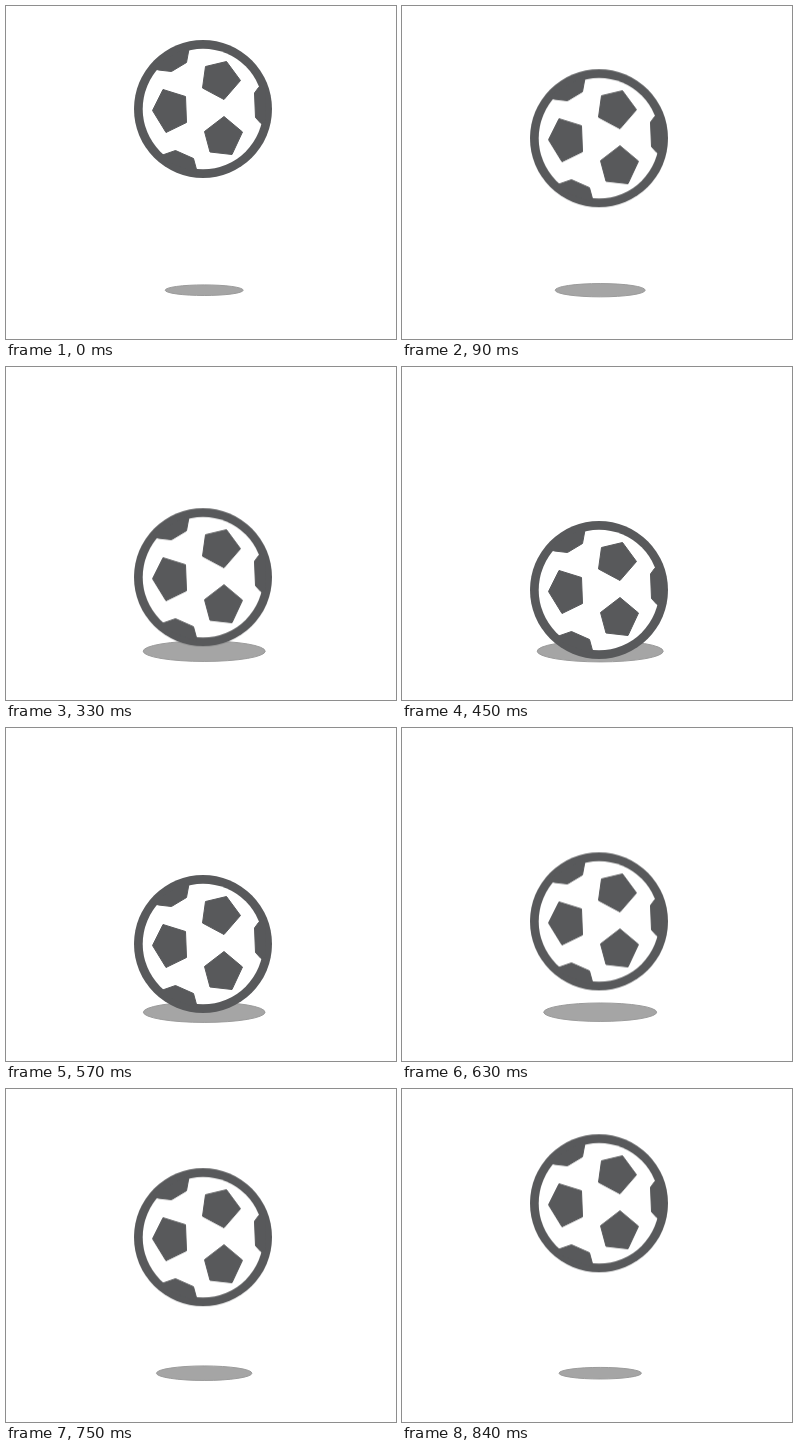
These frames come from a looping animation (390x333 px, 870 ms). An HTML page:

```html
<!DOCTYPE html>
<html lang="en">
<head>
<meta charset="utf-8">
<title>Bouncing ball</title>
<style>
  html, body { margin: 0; width: 100%; height: 100%; overflow: hidden; background: #fff; }
  svg { display: block; width: 390px; height: 333px; }

  .ball { animation: bounce 870ms infinite; }
  .shadow { fill: #a5a5a5; stroke: #9b9b9b; animation: spread 870ms infinite; }
  .ink { fill: #58595b; }
  .patch { fill: #58595b; stroke: #58595b; stroke-linejoin: round; }

  /* 29 ticks of 30 ms: 12 falling, 6 settling, 11 rising */
  @keyframes bounce {
    0% { transform: translateY(0); animation-timing-function: steps(12); }
    41.3793% { transform: translateY(117px); animation-timing-function: steps(6); }
    62.069% { transform: translateY(123px); animation-timing-function: steps(1); }
    65.5172% { transform: translateY(113px); animation-timing-function: steps(10); }
    100% { transform: translateY(0); }
  }
  @keyframes spread {
    0% { rx: 39px; ry: 5.3px; animation-timing-function: steps(12); }
    41.3793% { rx: 63px; ry: 10.7px; animation-timing-function: steps(1); }
    62.069% { rx: 63px; ry: 10.7px; animation-timing-function: steps(11); }
    100% { rx: 39px; ry: 5.3px; }
  }
</style>
</head>
<body>
<svg viewBox="0 0 390 333">
  <ellipse class="shadow" cx="198.2" cy="284.2" rx="39" ry="5.3"/>
  <g class="ball">
    <circle class="ink" cx="197" cy="103" r="69"/>
    <circle cx="197" cy="103" r="60.3" fill="#fff"/>
    <g class="patch">
      <!-- panels joined to the rim -->
      <path d="M148 62.5 152.5 64 165.5 65.5 180.5 56.5 183 43 182 40 147 60Z"/>
      <path d="M256 79 252.5 81.5 248.5 87 249.5 111.5 255 117.5 260 116 259 80Z"/>
      <path d="M154 150 158 148.5 169.5 144.5 187.5 152.5 190.5 163.5 190 167 156 154Z"/>
      <!-- free panels -->
      <path d="M199.5 60.5 220.5 55.5 234.5 74.5 218 93.5 196.5 82Z"/>
      <path d="M157 83.5 179.5 90.5 180.5 116.5 160 126.5 146.5 104.5Z"/>
      <path d="M218 110.5 236.5 126 226 148.5 204 146 198.5 125.5Z"/>
    </g>
  </g>
</svg>
</body>
</html>
```
